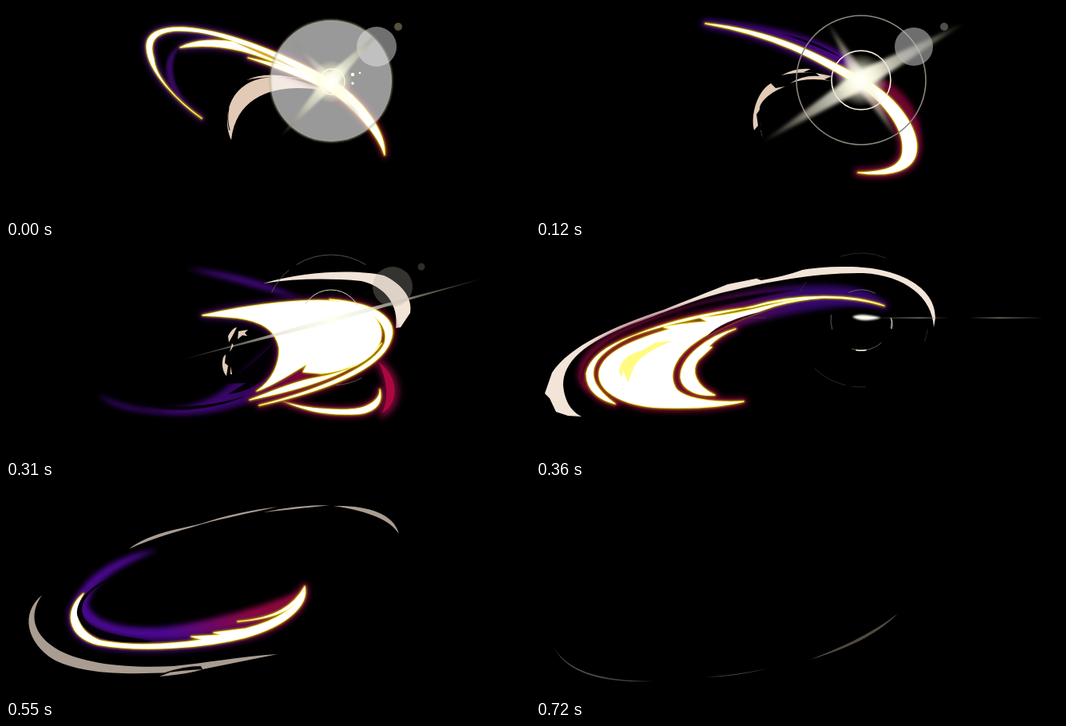
Recreate the animation shown at these times as an HTML page with a canvas. Size 656 by 266 pixels, loop 0.84 s.

```html
<!DOCTYPE html>
<html lang="en">
<head>
<meta charset="utf-8">
<title>Slash effect</title>
<style>
html, body { margin: 0; width: 100%; height: 100%; overflow: hidden; background: #000; }
canvas { display: block; }
</style>
</head>
<body>
<canvas id="stage" width="656" height="266"></canvas>
<script>
const ctx = document.getElementById('stage').getContext('2d');
const HOLD = 120;
const CX = 407, CY = 93; // flare centre
const PURPLE = '#3e0879', WINE = '#7c0a3c', CREAM = '#f3e4d8';

// Fill a path, or stroke it when a width is given.
function paint(d, style, blur = 0, width = 0) {
  const path = d instanceof Path2D ? d : new Path2D(d);
  ctx.filter = blur ? `blur(${blur}px)` : 'none';
  ctx.lineJoin = 'round';
  if (width) {
    ctx.strokeStyle = style;
    ctx.lineWidth = width;
    ctx.stroke(path);
  } else {
    ctx.fillStyle = style;
    ctx.fill(path);
  }
  ctx.filter = 'none';
}

function fade(x0, y0, x1, y1, from, to) {
  const g = ctx.createLinearGradient(x0, y0, x1, y1);
  g.addColorStop(0, from);
  g.addColorStop(1, to);
  return g;
}

function radial(x, y, r, ...colors) {
  const g = ctx.createRadialGradient(x, y, 0, x, y, r);
  colors.forEach((c, i) => g.addColorStop(i / (colors.length - 1), c));
  return g;
}

// White-hot shape with a yellow rim inside a coloured halo.
function fire(d, halo, spread = 10) {
  paint(d, halo, 3.5, spread);
  paint(d, '#a88b06', 1.2, 3.4);
  paint(d, '#fff04c', 0.6, 1.3);
  paint(d, '#fff', 0.5);
}

function circle(x, y, r, from = 0, to = 360) {
  const path = new Path2D();
  path.arc(x, y, r, from * Math.PI / 180, to * Math.PI / 180);
  return path;
}

const disc = (x, y, r, style) => paint(circle(x, y, r), style, 0.5);

function arcs(r, style, width, ...spans) {
  for (const [from, to] of spans) paint(circle(CX, CY, r, from, to), style, 0.3, width);
}

// Pointed beam, widest at the flare centre.
function ray(x0, y0, x1, y1, width, alpha = 1, blur = 1) {
  const len = Math.hypot(x1 - x0, y1 - y0);
  const nx = (y0 - y1) / len * width / 2, ny = (x1 - x0) / len * width / 2;
  const style = radial(CX, CY, len / 2, `rgba(255,255,240,${alpha})`,
    `rgba(215,212,190,${alpha * 0.7})`, `rgba(110,106,90,${alpha * 0.35})`);
  paint(`M${x0} ${y0}L${CX + nx} ${CY + ny}L${x1} ${y1}L${CX - nx} ${CY - ny}Z`, style, blur);
}

function glow(x, y, r) {
  paint(circle(x, y, r), radial(x, y, r, '#fff', 'rgba(255,255,230,.65)', 'rgba(255,255,210,0)'));
}

function sweepIn() {
  paint('M282 168C270 142 277 91 335 89C360 89 380 97 398 106C350 97 289 105 282 168Z', '#e2cab7');
  paint('M301 93Q330 78 390 97Q338 84 301 93Z', '#e2cab7');
  paint('M279 128Q276 142 280 156', '#000', 0, 1);
  paint('M218 50C193 62 193 98 228 125C207 98 203 70 218 50Z', '#35085f', 1.5);
  fire('M245 141C217 121 177 83 176 52C175 32 197 26 222 27C286 31 360 67 407 92' +
    'C447 117 476 158 474 187C466 162 438 129 404 105C375 92 330 74 303 65Q333 71 352 77' +
    'C313 60 275 45 218 52C235 42 266 41 290 46C264 36 235 30 210 31C184 34 179 47 185 66' +
    'C187 90 214 119 245 141Z', fade(240, 60, 420, 120, '#48127f', '#82142f'), 7);
  paint('M285 45Q325 56 366 80Q322 62 285 45Z', '#d9ae22', 0.7);
  disc(CX, 94, 76, 'rgba(255,255,255,.6)');
  paint(circle(CX, 94, 76), '#aaa68c', 0.8, 1.3);
  disc(464, 51, 25, 'rgba(235,235,235,.48)');
  disc(491, 26, 5, '#554f3c');
  ray(345, 163, 468, 32, 17, 1, 1.5);
  ray(359, 45, 446, 144, 11, 0.7, 1.5);
  paint('M350 66C382 80 438 109 460 146C438 125 380 94 350 66Z', '#fffff0', 1);
  paint(circle(408, 95, 16), '#fffcd0', 0.4, 1.3);
  glow(CX, 95, 27);
  disc(434, 86, 2.2, '#ffffe4');
  disc(434, 97, 1.7, '#ffffe4');
  disc(443, 84, 1.3, '#ffffe4');
}

function impact() {
  const bone = '#e2cbb7';
  paint('M273 156C268 135 278 106 294 97L300 103L312 101C293 108 279 121 280 130L276 136L278 150Z', bone);
  paint('M307 87Q325 77 344 79L335 83L350 84Q327 82 307 87Z', bone);
  paint('M318 97Q335 86 355 88L350 84L371 88L361 92L369 94Q340 89 318 97Z', bone);
  paint('M282 145Q280 155 284 165Q280 158 282 145Z', bone);
  paint('M214 20C285 18 355 40 391 64L407 90C350 64 290 36 214 20Z',
    fade(220, 20, 390, 70, '#210346', '#51098c'), 3);
  paint('M308 35Q350 43 381 64Q345 48 308 35Z', '#080010', 0.5);
  paint('M438 93C476 116 489 155 477 186C475 150 456 120 420 102Z', '#69052c', 3);
  fire('M212 22C300 30 362 65 408 90C458 117 484 162 475 188C467 212 430 213 403 209' +
    'C440 208 459 201 459 180C461 151 430 115 400 97C350 67 300 38 212 22Z',
    fade(370, 80, 435, 125, PURPLE, WINE));
  arcs(81, '#89867a', 1.6, [0, 360]);
  arcs(37, '#fffbe1', 1.5, [0, 360]);
  ray(365, 20, 455, 172, 17, 0.8, 2);
  ray(285, 170, 535, 22, 24, 1, 2);
  glow(CX, CY, 33);
  disc(473, 51, 24, 'rgba(190,190,190,.58)');
  disc(511, 26, 5, 'rgba(130,130,125,.6)');
}

function burst() {
  const bone = '#e2cbb7';
  paint('M271 151Q270 139 275 136L274 147L278 150L276 163Q272 159 271 151Z' +
    'M278 113Q283 103 289 102L285 110L279 121Z' +
    'M291 107L303 105L299 109L302 113L296 112L290 117Z' +
    'M283 122L285 125L280 133ZM281 151L283 161L281 161Z', bone);
  paint('M226 28C273 31 327 43 372 68C330 57 280 43 226 28Z', '#42087e', 3);
  paint('M115 186C152 206 205 213 250 193C278 183 300 151 341 118L335 180' +
    'C305 203 239 217 190 210C153 207 130 201 115 186Z', fade(115, 190, 335, 150, '#4a0890', '#2f0556'), 3);
  paint('M160 192C188 211 250 211 303 187C270 199 200 210 160 192Z', '#060009', 0.5);
  paint('M268 173C292 160 312 148 341 115L337 153Q316 181 278 186L300 172Z', '#030005', 0.5);
  paint('M318 187Q355 153 380 148L405 164Q358 181 318 187Z', '#87043e', 2);
  paint('M466 145C490 163 497 194 471 211C482 188 479 165 466 145Z', WINE, 4, 8);
  paint('M466 145C490 163 495 194 471 210C481 188 475 162 466 145Z', '#ac0840', 0.5);
  paint('M322 47C380 30 442 30 473 37C499 49 509 68 506 84L494 102L488 103C492 74 475 51 445 44C402 40 360 41 322 47Z', CREAM);
  fire('M345 194C375 206 430 208 448 202C462 197 469 188 468 180C473 199 460 212 430 211C392 212 370 204 345 194Z',
    WINE, 8);
  fire('M246 87C310 72 380 66 410 69C450 73 475 92 469 118C462 140 430 157 395 160L372 158L377 148' +
    'C360 158 335 175 314 182C335 168 343 145 342 128C338 105 320 94 289 90Q268 88 246 87Z' +
    'M405 67C470 72 492 95 481 120C468 155 400 182 317 200C400 178 462 150 474 122C480 100 462 78 405 67Z' +
    'M305 193C370 180 440 160 470 122C455 148 420 160 385 166C355 172 330 184 305 193Z',
    fade(290, 80, 390, 180, '#3b0864', '#74072f'), 8);
  arcs(82, '#66625a', 0.8, [205, 230], [238, 302], [62, 86]);
  arcs(38, '#d7d3bf', 1, [212, 330]);
  ray(222, 142, 600, 40, 6, 0.85, 0.7);
  disc(484, 51, 25, 'rgba(175,170,160,.3)');
  disc(520, 26, 4.5, '#302d27');
}

function sweepBack() {
  paint('M57 214L40 213L25 208L17 191L11 185L20 159C42 125 100 100 160 80C190 68 215 58 240 48L275 41' +
    'C310 33 350 25 390 26C453 26 500 51 500 90L498 102C496 64 462 37 410 34' +
    'C350 33 290 45 240 57C200 66 150 88 120 98C60 122 34 145 34 175C36 196 45 208 57 214Z', CREAM);
  paint('M276 41Q310 30 352 22Q324 36 282 43Z', '#000');
  paint('M52 165C50 112 145 86 225 66C300 46 380 45 409 55Q430 62 438 76C390 70 305 85 247 104' +
    'L180 115L70 185Q55 180 52 165Z', fade(160, 90, 340, 65, '#61082e', '#2c0860'), 3);
  paint('M58 172C50 125 130 96 200 75C245 64 290 57 330 55C260 67 190 87 140 103C85 124 62 144 58 172Z',
    '#050006', 0.8);
  fire('M436 75C400 61 330 58 270 76C180 96 73 112 63 160C63 183 82 194 99 198' +
    'C78 182 63 165 77 143C102 110 190 86 270 77C330 62 390 61 436 75Z' +
    'M360 65C330 65 302 72 270 80Q235 88 205 90L215 95Q175 98 160 102L168 104C110 121 83 137 79 158' +
    'C76 185 115 203 165 203C205 204 240 200 260 195C222 197 188 192 176 180' +
    'C163 160 176 136 202 119C230 100 273 84 300 75Q328 67 360 65Z' +
    'M250 104C215 113 180 140 181 165C183 182 205 189 224 187C200 176 193 157 203 143L220 127L216 126Q230 112 250 104Z',
    fade(215, 130, 320, 75, '#7d092e', PURPLE), 9);
  paint('M104 158Q105 138 133 131L150 121L171 119Q133 134 123 151L115 171L109 156L107 165Z', '#fffb82', 0.5);
  paint('M214 113Q232 94 280 83Q240 98 214 113Z', '#3a0418', 0.7);
  arcs(84, '#3c3932', 0.7, [252, 292], [205, 215], [103, 134], [8, 19], [86, 98]);
  arcs(38, '#777367', 0.8, [162, 190], [246, 298], [-4, 15], [48, 108]);
  paint(circle(CX, CY, 38, 80, 100), '#fffbe5', 0.4, 1.6);
  paint('M444 90Q447 95 445 104', '#c9c4b5', 0.5, 1.3);
  paint('M258 90H288', '#3b3629', 0.5, 1);
  paint('M425 90L480 89.4L516 90L480 90.8ZM542 90L580 89.4L636 90L580 90.7Z', '#8d887a', 0.4);
  paint('M396 89Q405 83 432 90Q409 97 396 89Z', '#fffdf2', 1);
}

function scoop() {
  const bone = '#a99c91';
  paint('M45 137C17 160 26 197 60 218C99 238 160 236 205 234L192 239Q229 236 246 230' +
    'L340 211C292 214 250 222 210 226C151 229 98 223 66 206C33 187 28 161 45 137Z', bone);
  paint('M196 235Q222 226 244 226L246 230Q222 231 196 235Z', '#000');
  paint('M154 79C179 60 207 56 245 47C274 37 308 30 340 26C305 34 274 40 245 48C212 58 184 65 154 79Z', bone);
  paint('M322 33Q362 24 405 24C371 28 347 30 322 33Z' +
    'M410 25C452 24 485 34 492 60C481 43 456 32 410 25Z', bone);
  paint('M190 80C139 84 88 119 87 150C93 187 170 199 235 190C293 179 360 162 372 130' +
    'C333 148 260 169 200 177C150 181 110 171 103 150C104 127 130 106 190 80Z',
    fade(200, 170, 300, 150, '#4a0890', '#8d0740'), 3);
  fire('M97 135C72 155 76 190 115 199C170 209 250 203 300 190C350 176 380 150 374 126' +
    'C369 150 340 169 300 179L260 184L270 187L232 189L246 193C200 200 150 201 118 194C90 183 82 160 97 135Z' +
    'M290 170C338 166 360 150 374 126C369 151 344 166 290 170Z',
    fade(220, 170, 340, 150, '#46087c', '#830b40'), 8);
  paint('M145 111C108 121 87 142 89 162C95 181 113 191 132 194Q158 198 185 195Q165 191 150 189' +
    'C112 182 96 172 95 155C96 138 114 122 145 111Z', '#050009', 0.7);
}

function trail() {
  const bone = '#8c8075';
  paint('M129 82C163 57 201 45 239 39C202 49 168 61 129 82Z' +
    'M345 21Q386 14 427 16Q385 17 345 21ZM452 21C481 25 498 44 497 62C494 43 479 30 452 21Z' +
    'M496 92Q490 114 464 131Q487 112 496 92Z', bone);
  paint('M31 168C28 197 56 218 105 228L74 224L87 230Q38 215 27 185L31 187Z', bone);
  paint('M118 230C163 236 224 237 285 226C335 219 368 208 397 194C368 215 320 226 264 232' +
    'L262 237Q205 243 156 238L133 237L149 235Z', bone);
  paint('M143 107C184 82 250 78 300 84L310 92C251 84 198 96 143 113Z',
    fade(145, 100, 320, 90, '#69082d', '#39084d'), 4);
  paint('M385 120C402 151 377 178 340 196C299 217 235 222 187 200C247 202 357 190 371 126Z',
    fade(190, 200, 320, 190, '#15032a', '#480779'), 4);
  paint('M386 124C398 148 383 172 354 186C370 165 386 148 383 130Z', '#76094f', 2);
  paint('M375 119C382 155 330 188 242 199C324 191 389 165 385 130Z', '#040007', 0.6);
  fire('M215 92C263 83 305 84 340 95C375 107 388 120 385 133C375 111 343 97 303 92Q257 87 215 92Z',
    fade(220, 90, 350, 100, '#650a32', '#3c0866'), 8);
  paint('M172 102Q210 89 270 89Q220 92 172 102Z', '#1a000b', 0.4);
}

function fadeOut() {
  const bone = '#50483f';
  paint('M22 201C36 230 78 245 147 245C75 248 35 231 22 201Z' +
    'M212 240Q252 237 290 229Q252 239 212 240Z' +
    'M343 218C380 203 416 188 453 160C424 190 383 206 343 218Z', bone);
}

const poses = [sweepIn, impact, burst, sweepBack, scoop, trail, fadeOut];
let shown = -1;

function tick() {
  const pose = Math.floor(performance.now() / HOLD) % poses.length;
  if (pose !== shown) {
    shown = pose;
    ctx.fillStyle = '#000';
    ctx.fillRect(0, 0, 656, 266);
    poses[pose]();
  }
  requestAnimationFrame(tick);
}
tick();
</script>
</body>
</html>
```
